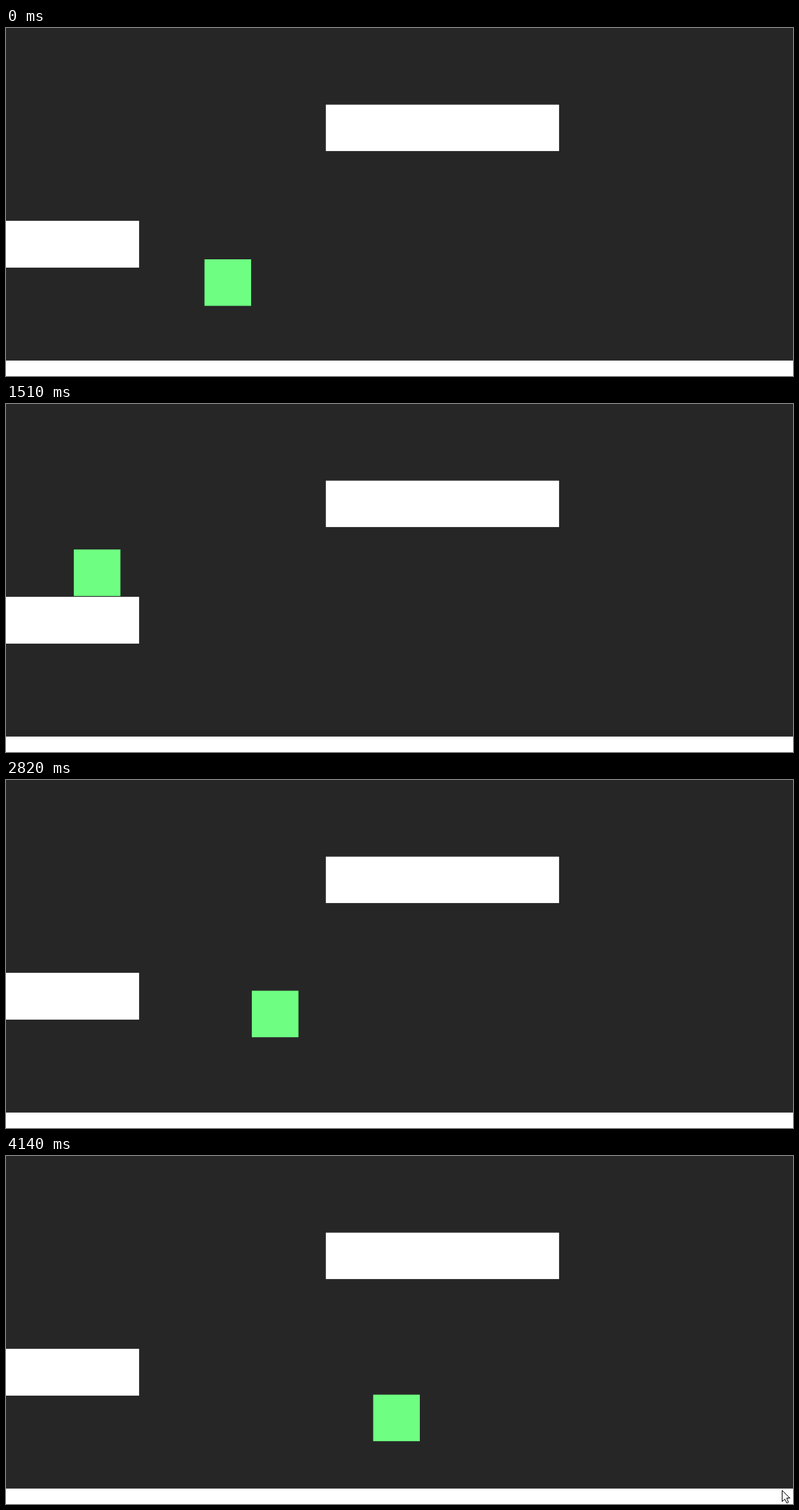
Recreate the animation shown at these times as an HTML page with a canvas. Size 1124 by 498 pixels, loop 4210 ms.

```html
<!DOCTYPE html>
<html lang="en">
<head>
<meta charset="utf-8">
<title>Moving square</title>
<style>
  html, body { margin: 0; width: 100%; height: 100%; overflow: hidden; background: #262626; }
  canvas { display: block; }
</style>
</head>
<body>
<canvas id="stage" width="1124" height="498"></canvas>
<script>
const LOOP = 4210;
const FRAME = 68.66;          // the picture refreshes at this interval
const STEP = 20;              // while a key is held, the square moves one unit per step
const UNIT = 40 / 3, SIZE = 66.6;
const START = { x: 283.5, y: 331 };
const ctx = document.getElementById('stage').getContext('2d');

// Key presses: time, units travelled right, units travelled down.
// Fractions are where a platform stops the square.
const presses = [
  [5, -6, 0],
  [420, 5, 0],
  [570, 0, -10],
  [869, -13, 0],
  [1350, 0, .79],
  [1690, 11, 0],
  [2019, 0, 9],
  [2245, -3.93, 0],
  [2568, 13, 0],
  [2770, 0, -16],
  [3232, 0, 11],
  [3445, 13, 0],
  [3750, -1, 0],
  [3820, 0, 6]
];

const pointer = { start: 3770, time: 349, from: [1121, 432], to: [1108, 478] };
const arrow = new Path2D('M.5 .5V16.5L4.5 13L7 18.5L9.5 17.5L7 11.5H11.5Z');

const travel = (distance, steps) => Math.sign(distance) * Math.min(Math.abs(distance), steps);

function squareAt(t) {
  let { x, y } = START;
  for (const [at, right, down] of presses) {
    const steps = Math.max(0, Math.floor((t - at) / STEP));
    x += travel(right, steps) * UNIT;
    y += travel(down, steps) * UNIT;
  }
  return { x, y };
}

function box(color, x, y, w, h) {
  ctx.fillStyle = color;
  ctx.fillRect(x, y, w, h);
}

function drawPointer(t) {
  const { start, time, from, to } = pointer;
  if (t < start) return;
  const p = Math.min(1, (t - start) / time);
  const eased = 1 - (1 - p) ** 2;
  const [x, y] = from.map((v, i) => Math.round(v + (to[i] - v) * eased));
  ctx.save();
  ctx.translate(x, y);
  ctx.fillStyle = '#fff';
  ctx.strokeStyle = '#000';
  ctx.fill(arrow);
  ctx.stroke(arrow);
  ctx.restore();
}

function draw(t) {
  box('#262626', 0, 0, 1124, 498);
  box('#fff', 0, 275.9, 190.1, 67);
  box('#fff', 456.8, 109.7, 333.1, 66.4);
  box('#fff', 0, 475.9, 1124, 23);
  const { x, y } = squareAt(t);
  box('#6eff82', x, y, SIZE, SIZE);
  drawPointer(t);
}

const began = performance.now();
function tick() {
  const t = (performance.now() - began) % LOOP;
  draw(Math.floor(t / FRAME) * FRAME);
  requestAnimationFrame(tick);
}
tick();
</script>
</body>
</html>
```
